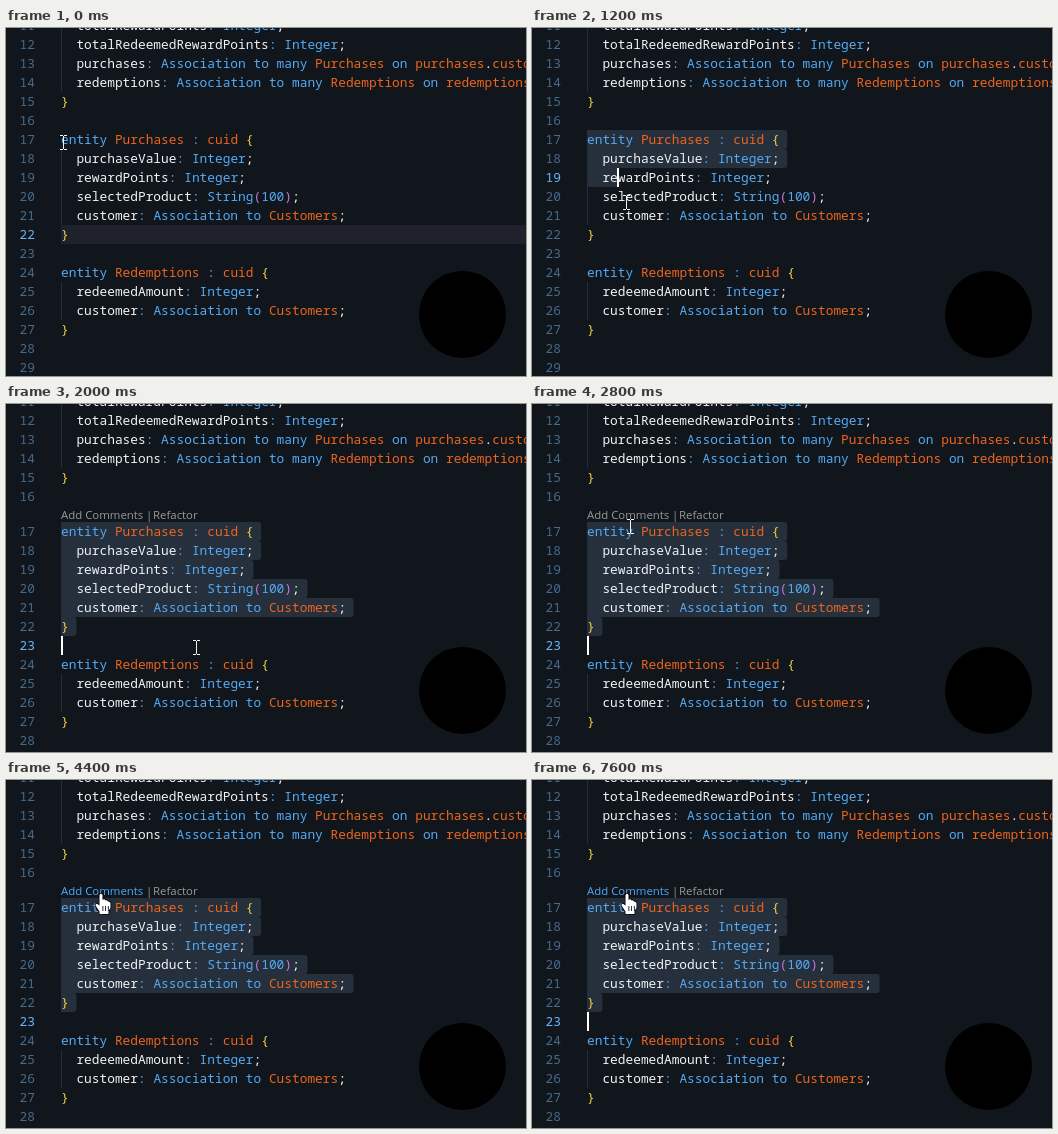
Write an HTML page with a canvas that moves like this. It is 520x348 px and loops after 8000 ms.

```html
<!DOCTYPE html>
<html lang="en">
<head>
<meta charset="utf-8">
<title>Selecting an entity in a code editor</title>
<style>
html, body { margin: 0; width: 100%; height: 100%; overflow: hidden; background: #11161c; }
canvas { display: block; width: 520px; height: 348px; }
</style>
</head>
<body>
<canvas id="stage" width="520" height="348"></canvas>
<script>
const ctx = document.getElementById('stage').getContext('2d');

const LOOP = 8000, STEP = 200;
const LEFT = 55, CHAR = 7.7, ROW = 19, FIRST = 11, TOP = -12, LENS = 16;
const CODE_FONT = '12.83px "Noto Sans Mono", "DejaVu Sans Mono", monospace';
const LENS_FONT = '11.4px "Open Sans", "Noto Sans", sans-serif';
const C = {
  bg: '#11161c', line: '#1f222d', sel: '#25303c', guide: '#262c35',
  num: '#466a8c', active: '#69b4fb', blue: '#55aaf5', orange: '#ec651f',
  white: '#f0f2f4', brace: '#f2d544', paren: '#c678dd', lens: '#999999', link: '#4daafc'
};

const lines = [
  '  totalRewardPoints: Integer;',
  '  totalRedeemedRewardPoints: Integer;',
  '  purchases: Association to many Purchases on purchases.customer',
  '  redemptions: Association to many Redemptions on redemptions.customer',
  '}',
  '',
  'entity Purchases : cuid {',
  '  purchaseValue: Integer;',
  '  rewardPoints: Integer;',
  '  selectedProduct: String(100);',
  '  customer: Association to Customers;',
  '}',
  '',
  'entity Redemptions : cuid {',
  '  redeemedAmount: Integer;',
  '  customer: Association to Customers;',
  '}',
  '',
  ''
];

// [start time, line, column] of the caret while dragging from 17:0
const carets = [
  [0, 22, 1], [200, 17, 0], [800, 17, 7], [1000, 18, 1], [1200, 19, 4],
  [1400, 21, 6], [1600, 22, 1], [1800, 23, 0]
];
// [start time, x, y] of the pointer
const mouse = [
  [0, 57, 114], [600, 62, 117], [800, 71, 126], [1000, 83, 141], [1200, 94, 174],
  [1400, 106, 212], [1600, 121, 229], [1800, 150, 240], [2000, 190, 243],
  [2200, 217, 242], [2400, 228, 238], [2600, 160, 176], [2800, 98, 122], [4200, 95, 114]
];

const at = (track, t) => track.filter(p => p[0] <= t).pop();
const colX = col => LEFT + col * CHAR;

function text(str, x, y, color, font = CODE_FONT) {
  ctx.font = font;
  ctx.fillStyle = color;
  ctx.fillText(str, x, y);
}

function tokenColor(word, next) {
  if (/^[{}]$/.test(word)) return C.brace;
  if (/^[()]$/.test(word)) return C.paren;
  if (/^[;.]$/.test(word)) return C.white;
  if (/^(entity|Association|to|many|on|Integer|String|\d+|:)$/.test(word)) return C.blue;
  return next === ':' ? C.white : C.orange;
}

function drawCode(str, y) {
  for (const m of str.matchAll(/\w+|[^\w\s]/g)) {
    const next = str[m.index + m[0].length];
    text(m[0], colX(m.index), y, tokenColor(m[0], next));
  }
}

function drawSelection(line, col, rowY) {
  ctx.fillStyle = C.sel;
  for (let n = 17; n <= line; n++) {
    const end = n < line ? lines[n - FIRST].length + 1 : col;
    if (!end) continue;
    ctx.beginPath();
    ctx.roundRect(LEFT, rowY(n), end * CHAR, ROW, n < line ? [0, 3, 3, 0] : [0, 0, 3, 3]);
    ctx.fill();
  }
}

function drawBeam(x, y) {
  ctx.fillStyle = '#f4f4f4';
  ctx.fillRect(x, y - 6, 1, 13);
  for (const dy of [-7, 7]) {
    ctx.fillRect(x - 3, y + dy, 3, 1);
    ctx.fillRect(x + 1, y + dy, 3, 1);
  }
}

function drawHand(x, y) {
  ctx.save();
  ctx.translate(x, y);
  ctx.beginPath();
  ctx.moveTo(-1.5, 1);
  ctx.quadraticCurveTo(0, -2, 1.5, 1);
  ctx.lineTo(1.5, 6);
  // knuckles
  for (const [kx, ky] of [[4.5, 6.5], [7, 7.5], [9.5, 9]])
    ctx.quadraticCurveTo(kx - 1, ky - 2, kx, ky);
  ctx.lineTo(9.5, 14);
  ctx.lineTo(7.5, 17);
  ctx.lineTo(7.5, 20);
  ctx.lineTo(-1.5, 20);
  ctx.lineTo(-1.5, 17.5);
  ctx.lineTo(-5.5, 11.5);
  ctx.quadraticCurveTo(-5.5, 8, -1.5, 11.5);
  ctx.closePath();
  ctx.lineJoin = 'round';
  ctx.lineWidth = 1.6;
  ctx.strokeStyle = '#000';
  ctx.stroke();
  ctx.fillStyle = '#fff';
  ctx.fill();
  ctx.fillStyle = '#000';
  for (const dx of [1.5, 4.2, 6.9]) ctx.fillRect(dx, 12, 0.8, 5);
  ctx.restore();
}

function draw(t) {
  const lens = t >= 1400, hover = t >= 4200;
  const [, line, col] = at(carets, t);
  const [, mx, my] = at(mouse, t);
  const rowY = n => TOP + (n - FIRST) * ROW + (lens && n >= 17 ? LENS : 0);
  const selecting = t >= 800;

  ctx.fillStyle = C.bg;
  ctx.fillRect(0, 0, 520, 348);
  if (selecting) drawSelection(line, col, rowY);
  else {
    ctx.fillStyle = C.line;
    ctx.fillRect(LEFT, rowY(line), 520 - LEFT, ROW);
  }

  lines.forEach((str, i) => {
    const n = FIRST + i, y = rowY(n);
    if (str.startsWith(' ')) {
      ctx.fillStyle = C.guide;
      ctx.fillRect(LEFT, y, 1, ROW);
    }
    text(n, 13.5, y + 14, n === line ? C.active : C.num);
    drawCode(str, y + 14);
  });

  if (lens) {
    text('Add Comments', 55, 115, hover ? C.link : C.lens, LENS_FONT);
    text('|', 140, 115, C.lens, LENS_FONT);
    text('Refactor', 147, 115, C.lens, LENS_FONT);
  }

  const blinkOff = t >= 3000 && t % 1000 >= 200 && t % 1000 < 600;
  if (t >= 200 && !blinkOff) {
    ctx.fillStyle = '#fff';
    ctx.fillRect(Math.floor(colX(col)), rowY(line), 2, ROW);
  }

  ctx.fillStyle = '#000';
  ctx.beginPath();
  ctx.arc(456.5, 286.5, 43.5, 0, Math.PI * 2);
  ctx.fill();

  (hover ? drawHand : drawBeam)(mx, my);
}

const start = performance.now();
function tick() {
  const t = (performance.now() - start) % LOOP;
  draw(Math.floor(t / STEP) * STEP);
  requestAnimationFrame(tick);
}
tick();
</script>
</body>
</html>
```
